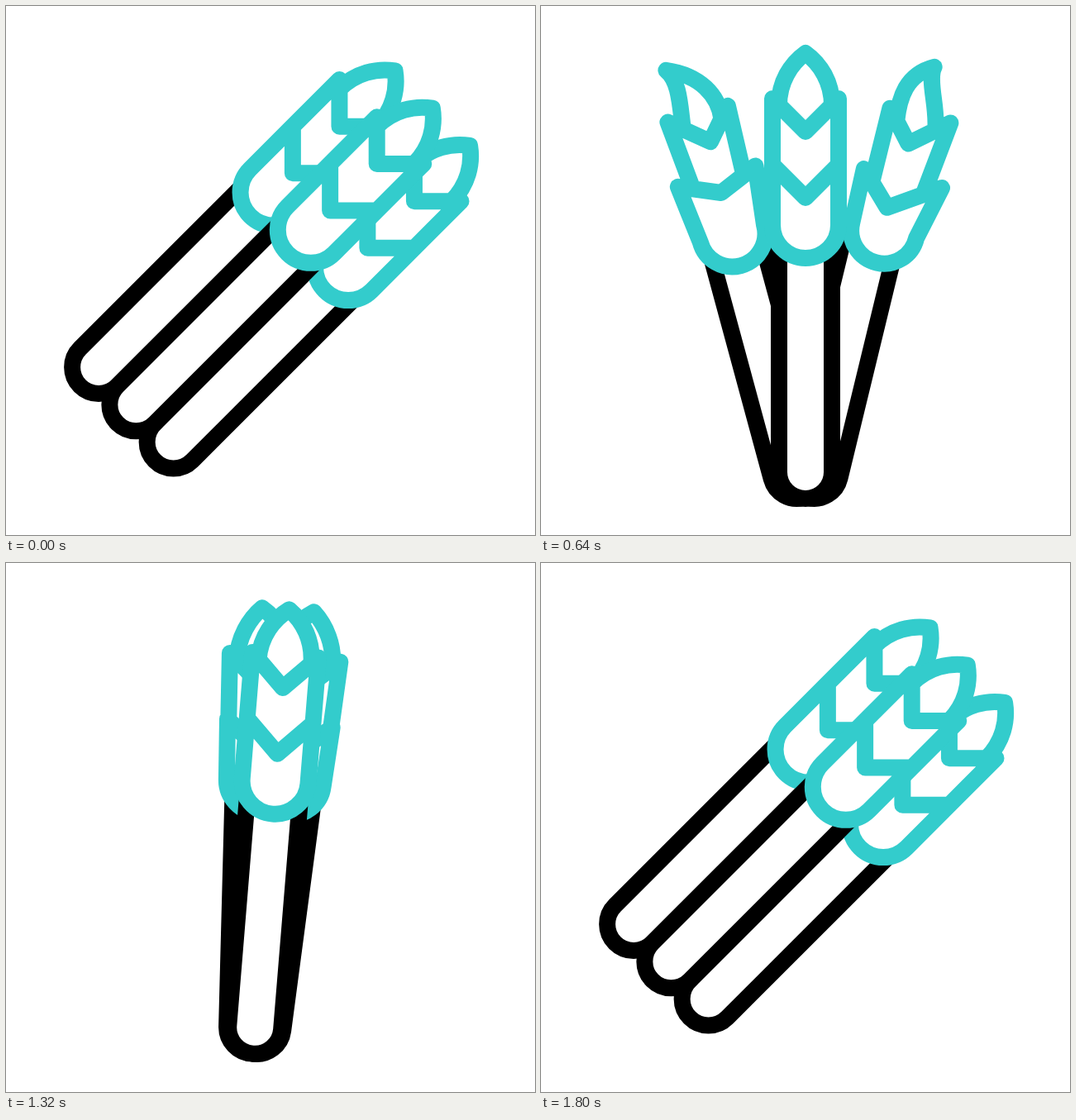
Write an HTML page that moves like this. It is 640 px wide and 640 px high and loops after 2 s.

```html
<!DOCTYPE html>
<html lang="en">
<head>
<meta charset="utf-8">
<title>Asparagus</title>
<style>
  html, body { margin: 0; width: 100%; height: 100%; overflow: hidden; background: #fff; }
  svg { display: block; width: 100vw; height: 100vh; }
  path { fill: #fff; stroke-width: 20; stroke-linejoin: round; }
  .stem { stroke: #000; }
  .head { stroke: #33cccc; }
</style>
</head>
<body>
<svg viewBox="0 0 640 640">
  <g id="bunch"></g>
</svg>
<script>
const LOOP = 2000, STEP = 40;
const STEM = 'M-32-290V0A32 32 0 0 0 32 0V-290';

const bunch = document.getElementById('bunch');

// Smooth 0 to 1 between two times.
function ramp(t, from, to) {
  const u = Math.min(1, Math.max(0, (t - from) / (to - from)));
  return u * u * (3 - 2 * u);
}

function mix([ax, ay], [bx, by], u) {
  return [ax + (bx - ax) * u, ay + (by - ay) * u];
}

// A notched rim: outer corner, notch, inner corner. Negative x is the outer side.
function rim(x, y, half, notch) {
  return [[x - half, y], notch, [x + half, y]];
}

// Leaf, middle scale and cup, measured from the foot of the stem.
function headPath(bend, drift, lift) {
  const d = drift * bend;
  const [topOut, topNotch, topIn] =
    rim(d - 2 * bend, -452 + 2 * bend, 40 - 2 * bend, [d + 3 * bend, -412 - bend]);
  const [midOut, midNotch, midIn] =
    rim(d, -372 + bend, 40 + 7 * bend, [d / 2, -332 - lift * bend]);
  const cup = d * 0.65, cupY = -299 - Math.abs(d) / 4;

  const tip = [-21 * bend, -507 - 3 * bend];
  const leafSide = (corner, sign) => {
    const base = mix(corner, topNotch, 0.2 + 0.13 * bend);
    const swell = [base[0] + 3 * bend, base[1] - 28];
    const neck = [d * 0.37 + sign * (18 - 4 * bend), -494];
    return [base, swell, neck];
  };
  const [out, out1, out2] = leafSide(topOut, -1);
  const [inn, inn1, inn2] = leafSide(topIn, 1);
  const footOut = mix(midOut, midNotch, 0.28 * bend);
  const footIn = mix(midIn, midNotch, 0.28 * bend);
  const shape = (...points) => `M${points.join('L')}`;

  return `M${out}C${out1} ${out2} ${tip}C${inn2} ${inn1} ${inn}L${topNotch}Z` +
    shape(topOut, topNotch, topIn, footIn, midNotch, footOut) + 'Z' +
    shape([cup - 40, cupY], midOut, midNotch, midIn, [cup + 40, cupY]) +
    `A40 40 0 0 1 ${cup - 40} ${cupY}Z`;
}

function add(parent, tag, attrs = {}) {
  const el = document.createElementNS('http://www.w3.org/2000/svg', tag);
  for (const name in attrs) el.setAttribute(name, attrs[name]);
  return parent.appendChild(el);
}

function makeStalk(look) {
  const group = add(bunch, 'g');
  add(group, 'path', { class: 'stem', d: STEM });
  return { ...look, group, head: add(group, 'path', { class: 'head' }) };
}

const stalks = [
  { side: -1, lean: 1, flex: 1, drift: 0, lift: 15 },
  { side: 1, lean: 0.9, flex: 1, drift: -17, lift: 0 },
  { side: 0, lean: 0, flex: 0, drift: 0, lift: 0 }
].map(makeStalk);

function draw(t) {
  const tilt = 1 - ramp(t, 80, 440) + ramp(t, 1240, 1640);
  const gap = 64 * (1 - ramp(t, 90, 460) + ramp(t, 1405, 1800));
  const settle = ramp(t, 620, 1080), close = ramp(t, 1120, 1440);
  const flare = 15.2 * ramp(t, 410, 620) - 5.15 * settle - 10.05 * close;
  const bend = 1.22 * ramp(t, 320, 620) - 0.85 * settle - 0.37 * close;

  bunch.setAttribute('transform',
    `translate(0 ${-14.4 * tilt}) rotate(${45 * tilt} 320 334)`);
  for (const { side, lean, flex, drift, lift, group, head } of stalks) {
    const x = 320 + side * (gap + flare * 0.68);
    group.setAttribute('transform',
      `translate(${x} 564) scale(${side > 0 ? -1 : 1} 1) rotate(${-flare * lean})`);
    head.setAttribute('d', headPath(bend * flex, drift, lift));
  }
}

const start = performance.now();
function tick() {
  const t = (performance.now() - start) % LOOP;
  draw(Math.floor(t / STEP) * STEP);
  requestAnimationFrame(tick);
}
tick();
</script>
</body>
</html>
```
